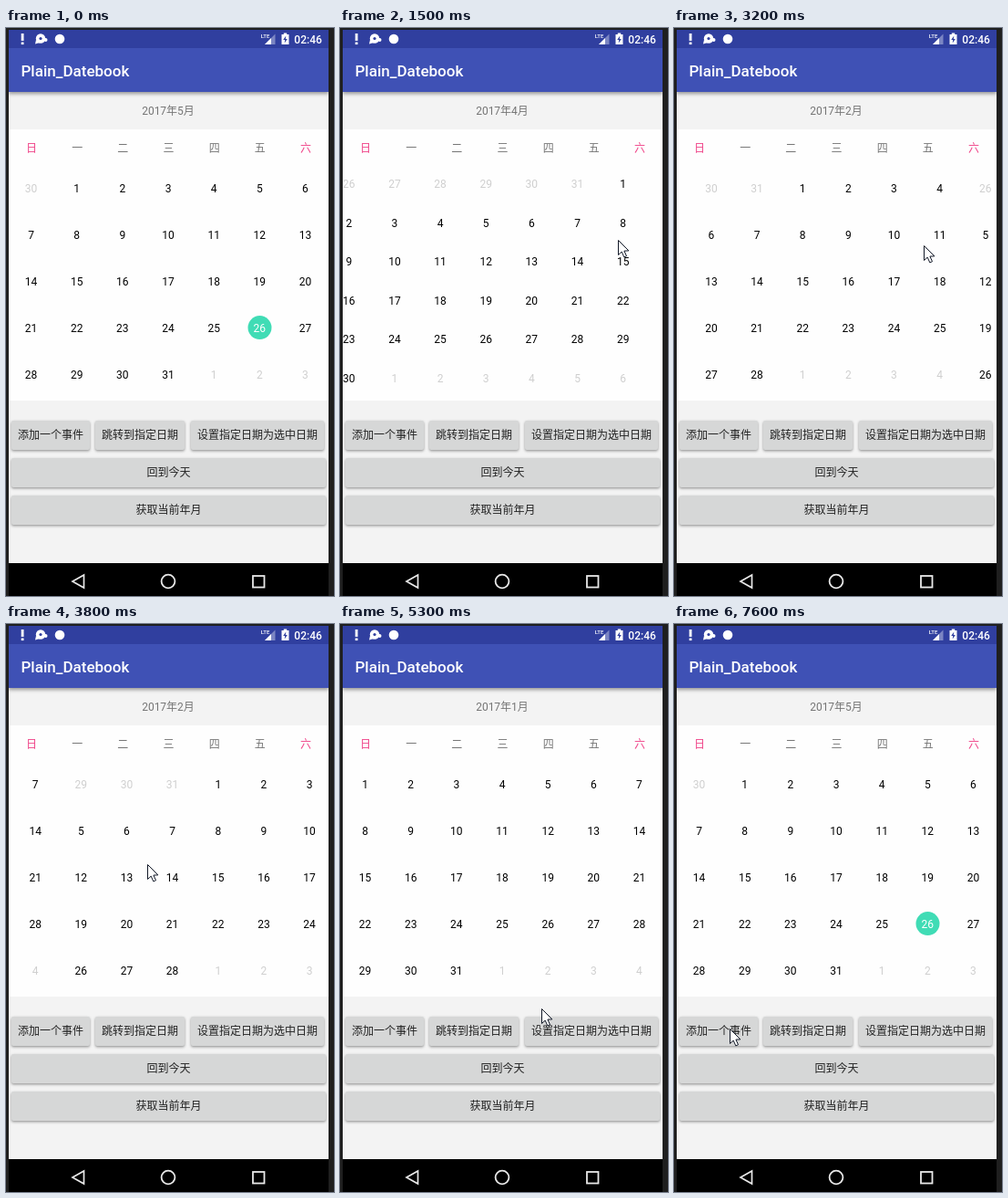
Animation, 360 px wide and 622 px high, one loop 8000 ms. Source, as an HTML page with a canvas:

```html
<!DOCTYPE html>
<html lang="zh-CN">
<head>
<meta charset="utf-8">
<title>Calendar</title>
<style>
html, body { margin: 0; width: 100%; height: 100%; overflow: hidden; background: #1f1f1f; }
canvas { display: block; width: 360px; height: 622px; }
</style>
</head>
<body>
<canvas id="stage"></canvas>
<script>
const W = 360, H = 622, LOOP = 8000, STEP = 100;
const LEFT = 3, PAGE = 351, COL = PAGE / 7;
const GRID_TOP = 150, GRID_H = 255;
const FONT = 'Roboto, "Noto Sans CJK SC", "Noto Sans CJK", sans-serif';
const MONTHS = [5, 4, 3, 2, 1];
const SETTLE = 390;
const JUMP = 6600;

// Each swipe: drag start, release, share of a page dragged before release.
const SWIPES = [
  { start: 820, release: 1267, share: 0.55 },
  { start: 1900, release: 2151, share: 0.38 },
  { start: 2800, release: 2998, share: 0.396 },
  { start: 3700, release: 3950, share: 0.39 }
];

// Pointer path: time, x, y.
const PATH = [
  [200, 299, 94], [400, 257, 122], [700, 106, 238], [820, 106, 238],
  [1267, 305, 232], [1500, 305, 232], [1700, 150, 250], [1800, 140, 255],
  [1900, 140, 255], [2151, 274, 255], [2400, 274, 255], [2700, 135, 240],
  [2800, 135, 240], [2998, 274, 238], [3200, 274, 238], [3600, 100, 262],
  [3700, 100, 262], [3950, 237, 265], [4200, 237, 265], [4400, 181, 273],
  [4600, 70, 295], [4900, 113, 347], [5200, 232, 390], [5500, 200, 484],
  [6000, 111, 467], [6200, 123, 486], [7000, 123, 486], [7600, 61, 443]
];

const BUTTONS = [
  [6, 430, 86, '添加一个事件'],
  [98, 430, 98, '跳转到指定日期'],
  [203, 430, 146, '设置指定日期为选中日期'],
  [6, 471, 345, '回到今天'],
  [6, 512, 345, '获取当前年月']
];

const canvas = document.getElementById('stage');
const ctx = canvas.getContext('2d');
const dpr = window.devicePixelRatio || 1;
canvas.width = W * dpr;
canvas.height = H * dpr;
ctx.scale(dpr, dpr);

function rect(x, y, w, h, color) {
  ctx.fillStyle = color;
  ctx.fillRect(x, y, w, h);
}

function disc(x, y, r, color) {
  ctx.fillStyle = color;
  ctx.beginPath();
  ctx.arc(x, y, r, 0, 7);
  ctx.fill();
}

function poly(points, fill, stroke, width) {
  ctx.beginPath();
  points.forEach(([x, y]) => ctx.lineTo(x, y));
  ctx.closePath();
  if (fill) { ctx.fillStyle = fill; ctx.fill(); }
  if (stroke) { ctx.strokeStyle = stroke; ctx.lineWidth = width; ctx.stroke(); }
}

function text(str, x, y, color, size = 12, weight = 400, align = 'center') {
  ctx.font = `${weight} ${size}px ${FONT}`;
  ctx.textAlign = align;
  ctx.fillStyle = color;
  ctx.fillText(str, x, y);
}

function shadowed(color, blur, dy, draw) {
  ctx.save();
  ctx.shadowColor = color;
  ctx.shadowBlur = blur * dpr;
  ctx.shadowOffsetY = dy * dpr;
  draw();
  ctx.restore();
}

function pagePosition(t) {
  if (t >= JUMP) return 0;
  return SWIPES.reduce((sum, { start, release, share }) => {
    if (t <= start) return sum;
    if (t < release) return sum + share * (t - start) / (release - start);
    const u = Math.min(1, (t - release) / SETTLE);
    return sum + 1 - (1 - share) * Math.pow(1 - u, 2.4);
  }, 0);
}

function currentMonth(t) {
  return t >= JUMP ? MONTHS[0] : MONTHS[SWIPES.filter(s => t >= s.release).length];
}

function pointerAt(t) {
  if (t < PATH[0][0]) return null;
  const i = PATH.findIndex(p => p[0] > t);
  if (i < 0) return PATH[PATH.length - 1].slice(1);
  const [t0, x0, y0] = PATH[i - 1], [t1, x1, y1] = PATH[i];
  const u = (t - t0) / (t1 - t0);
  return [Math.round(x0 + (x1 - x0) * u), Math.round(y0 + (y1 - y0) * u)];
}

function drawStatus() {
  rect(LEFT, 2, PAGE, 20, '#303f9f');
  rect(16.7, 6, 2.8, 8, '#fff');
  rect(16.7, 15.5, 2.8, 2.6, '#fff');
  disc(38, 11.5, 5.2, '#fff');
  disc(38, 11.5, 1.6, '#303f9f');
  disc(43.5, 13, 2, '#fff');
  poly([[32, 17.5], [33, 13], [37, 16]], '#fff');
  disc(59, 12, 5.3, '#fff');

  text('LTE', 284.5, 11, '#fff', 6, 500);
  poly([[284, 18], [295.5, 18], [295.5, 6.5]], '#7c86c3');
  poly([[284, 18], [291, 18], [291, 11]], '#fff');
  rect(302.5, 7, 8, 11, '#fff');
  rect(304.8, 5.5, 3.4, 2, '#fff');
  poly([[307.3, 8.5], [304.2, 13], [306.2, 13], [305.7, 16.5], [308.8, 12], [306.8, 12]], '#303f9f');
  text('02:46', 346.8, 17, '#fff', 12, 500, 'right');
}

function drawBar() {
  shadowed('rgba(0,0,0,.4)', 4, 1.5, () => rect(LEFT, 22, PAGE, 48, '#3f51b5'));
  text('Plain_Datebook', 16.5, 53, '#fff', 17, 500, 'left');
}

function drawMonth(month, x) {
  const lead = new Date(2017, month - 1, 1).getDay();
  const days = new Date(2017, month, 0).getDate();
  const rows = Math.ceil((lead + days) / 7);
  const rowH = GRID_H / rows;
  for (let i = 0; i < rows * 7; i++) {
    const date = new Date(2017, month - 1, i - lead + 1);
    const inside = date.getMonth() === month - 1;
    const today = inside && month === 5 && date.getDate() === 26;
    const cx = x + (i % 7 + 0.5) * COL - 0.5;
    const cy = GRID_TOP + (Math.floor(i / 7) + 0.5) * rowH;
    if (today) disc(cx + 0.2, cy - 0.4, 13, '#40dcb5');
    text(date.getDate(), cx, Math.round(cy + 4), today ? '#fff' : inside ? '#000' : '#cfcfcf');
  }
}

function drawCalendar(t) {
  text(`2017年${currentMonth(t)}月`, 178, 95, '#757575');
  rect(LEFT, 111, PAGE, 297, '#fefefe');
  [...'日一二三四五六'].forEach((name, i) => {
    text(name, LEFT + (i + 0.5) * COL, 136, i % 6 ? '#757575' : '#f0468a');
  });
  const pos = pagePosition(t);
  MONTHS.forEach((month, i) => {
    const shift = (pos - i) * PAGE;
    if (Math.abs(shift) < PAGE) drawMonth(month, LEFT + shift);
  });
}

function drawButton([x, y, w, label], pressed) {
  const h = 32;
  shadowed('rgba(0,0,0,.4)', pressed ? 6 : 3, pressed ? 3 : 1.2, () => {
    ctx.fillStyle = pressed ? '#c6c7c7' : '#d6d7d7';
    ctx.beginPath();
    ctx.roundRect(x, y, w, h, 2);
    ctx.fill();
  });
  text(label, x + w / 2, y + 20, '#222');
}

function drawNav() {
  rect(LEFT, 586, PAGE, 36, '#000');
  const line = '#e8e8e8';
  poly([[73, 606], [85.5, 599], [85.5, 613]], null, line, 1.7);
  ctx.strokeStyle = line;
  ctx.lineWidth = 1.8;
  ctx.beginPath();
  ctx.arc(178, 606, 7.4, 0, 7);
  ctx.stroke();
  ctx.strokeRect(271, 600, 12.5, 12.5);
}

function drawPointer([x, y]) {
  const shape = [[0, 0], [0, 16], [3.7, 12.6], [6.3, 18.4], [9, 17.2], [6.4, 11.6], [11.4, 11.4]];
  poly(shape.map(([a, b]) => [x + 0.5 + a, y + 0.5 + b]), '#fff', '#111827', 1);
}

function draw(t) {
  rect(0, 0, W, H, '#1f1f1f');
  ctx.save();
  ctx.beginPath();
  ctx.rect(LEFT, 2, PAGE, H - 2);
  ctx.clip();
  rect(LEFT, 2, PAGE, H, '#f3f3f3');
  drawCalendar(t);
  drawBar();
  drawStatus();
  BUTTONS.forEach((b, i) => drawButton(b, i === 3 && t >= 6500 && t < 6700));
  drawNav();
  ctx.restore();
  const pointer = pointerAt(t);
  if (pointer) drawPointer(pointer);
}

const origin = performance.now();

// The screen refreshes ten times a second.
function tick() {
  const t = (performance.now() - origin) % LOOP;
  draw(Math.floor(t / STEP) * STEP);
  requestAnimationFrame(tick);
}
tick();
</script>
</body>
</html>
```
